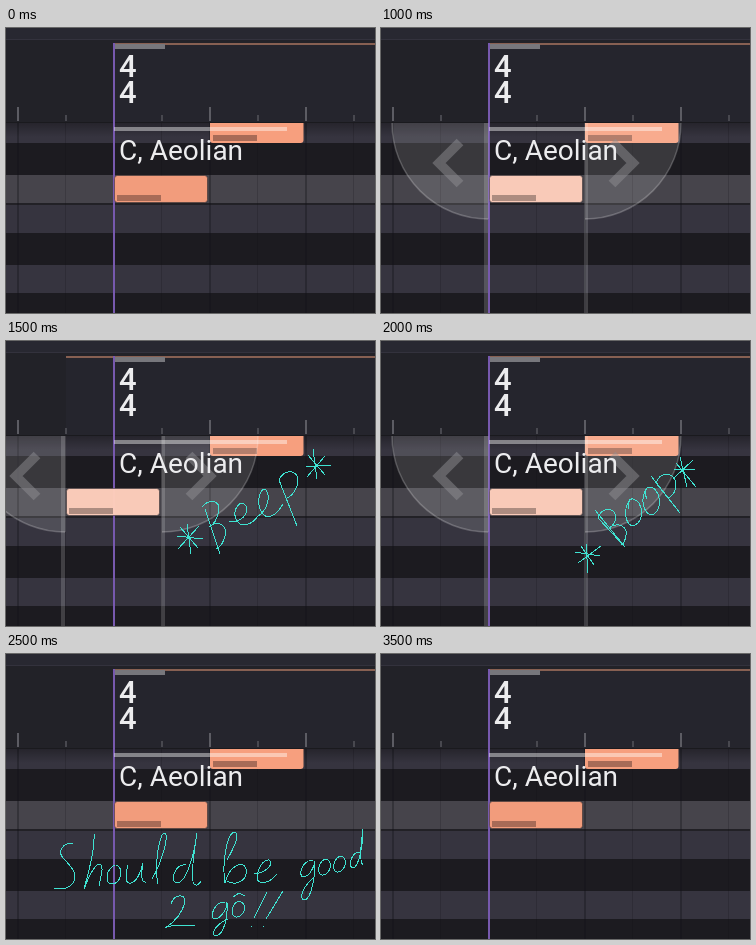
An HTML page for the animation above (4 s loop, 369 px wide and 285 px high).

```html
<!DOCTYPE html>
<html lang="en">
<head>
<meta charset="utf-8">
<style>
  html, body { margin: 0; width: 100%; height: 100%; overflow: hidden; background: #1c1b20; }
  svg { display: block; width: 369px; height: 285px; }
  text { font-family: Roboto, sans-serif; font-size: 28px; fill: #ececee; }
  .meter { font-size: 31px; font-weight: 500; }
  .ink { fill: none; stroke: #3fe3d2; stroke-width: 1; shape-rendering: crispEdges; }
  .chevron { fill: none; stroke: #909094; stroke-opacity: .48; stroke-width: 9.5; }
  .wedge { fill: #fff; fill-opacity: .125; }
  .rim { fill: none; stroke: #fff; stroke-opacity: .22; stroke-width: 1.5; }
  .outline { stroke: #1c1b20; stroke-opacity: .45; }
</style>
</head>
<body>
<svg viewBox="0 0 369 285">
  <defs>
    <linearGradient id="shadow" x2="0" y2="1">
      <stop stop-opacity=".3"/>
      <stop offset="1" stop-opacity="0"/>
    </linearGradient>
  </defs>
  <g id="backdrop"></g>
  <rect y="95" width="369" height="14" fill="url(#shadow)"/>
  <rect id="clipShade" y="15" height="79" fill="#25252d"/>
  <rect id="clipEdge" y="15" height="2" fill="#876052"/>
  <g id="ticks"></g>
  <rect x="107" y="15" width="2" height="270" fill="#7759ae"/>
  <rect x="109" y="16" width="50" height="5" fill="#77777c"/>

  <path d="M204 95H297.5V112Q297.5 115 294.5 115H207Q204 115 204 112Z" fill="#f79f7e"/>
  <rect x="207" y="107" width="44" height="6" fill="#a86b57"/>
  <g id="note">
    <rect id="noteBody" class="outline" x="108.5" y="147.5" width="93" height="27" rx="3" fill-opacity=".97"/>
    <rect id="noteBar" x="111" y="167" width="44" height="6"/>
  </g>

  <g id="handles">
    <path class="wedge" d="M108 95V191A96 96 0 0 1 11 95ZM204 95V191A96 96 0 0 0 300 95Z"/>
    <path class="rim" d="M107 191A96 96 0 0 1 11 95M204 191A96 96 0 0 0 300 95"/>
    <path d="M103 95h4v190h-4zM203 95h4v190h-4z" fill="#fff" fill-opacity=".16"/>
    <path class="chevron" d="M79 114L58 135L79 156M231 114L252 135L231 156"/>
  </g>

  <rect x="108" y="99" width="173" height="4" fill="#fff" fill-opacity=".42"/>
  <text class="meter" x="113" y="49">4</text>
  <text class="meter" x="113" y="75">4</text>
  <text x="113" y="132">C, Aeolian</text>

  <g class="ink" id="beep">
    <path d="M171 195L197 198M181 183L185 213M172 208L193 185M174 186L192 207"/>
    <path d="M199 168L214 213M196 166C202 158 214 159 213 168C212 177 208 184 203 186C212 178 222 185 219 195C217 203 213 207 210 208"/>
    <path d="M223 180C234 183 244 172 240 165C235 157 226 168 230 178C234 188 246 184 252 175C261 170 265 155 260 149C254 145 250 161 255 170C260 181 271 174 277 163"/>
    <path d="M291 185L273 139C277 130 287 128 291 135C294 143 288 154 281 157"/>
    <path d="M300 126L325 124M307 108L311 138M301 136L319 115M302 114L319 134"/>
  </g>
  <g class="ink" id="boop">
    <path d="M194 211L219 215M205 203L207 232M197 222L220 205M200 205L213 224"/>
    <path d="M214 169L244 206L217 177C220 167 231 166 234 173C236 180 232 185 228 187C237 180 247 186 245 194C244 200 242 204 240 204"/>
    <path d="M249 159C241 169 245 188 254 184C264 179 262 160 252 158C248 157 246 162 248 168"/>
    <path d="M266 147C258 157 263 177 273 173C282 167 279 147 269 146C264 146 263 153 266 158"/>
    <path d="M270 135L299 172L275 142C279 131 290 131 294 139C297 148 292 156 286 157"/>
    <path d="M293 128L314 128M299 116L306 146M293 137L312 119M295 122L315 146"/>
  </g>
  <g class="ink" id="ready">
    <path d="M67 189C57 189 51 197 57 204C64 211 73 220 67 229C63 235 54 236 48 234"/>
    <path d="M88 178C89 196 83 216 78 235C83 222 90 207 95 211C99 216 92 226 94 232"/>
    <path d="M109 211C100 215 98 230 106 230C116 229 118 213 110 211"/>
    <path d="M122 211C119 223 119 230 125 229C132 227 135 217 137 209C135 220 135 229 140 228"/>
    <path d="M146 225C156 208 163 182 159 179C153 179 148 213 152 230"/>
    <path d="M180 211C169 209 163 228 171 229C180 229 188 202 191 179C188 198 184 225 188 230C191 233 194 229 195 227"/>
    <path d="M221 206C230 190 234 179 228 178C220 181 216 212 219 229C223 212 237 205 240 215C242 225 232 233 221 227"/>
    <path d="M248 220C260 219 269 209 263 206C254 205 247 226 254 228C261 230 267 225 271 220"/>
    <path d="M307 207C298 204 291 221 297 223C303 223 308 214 309 207C309 225 305 244 299 246C292 246 296 234 307 224"/>
    <path d="M319 205C311 209 311 222 317 221C326 219 327 205 319 205"/>
    <path d="M334 202C326 206 326 219 332 218C341 216 342 202 334 202"/>
    <path d="M354 199C346 196 341 213 347 214C353 213 357 191 357 175C355 191 353 207 357 211"/>
    <path d="M165 250C168 240 180 239 179 248C176 260 167 269 159 274C168 269 177 272 189 271"/>
    <path d="M219 249C210 246 203 262 208 265C215 265 221 255 221 248C222 264 218 280 210 282C203 281 210 270 222 265"/>
    <path d="M232 247C224 252 225 264 231 263C240 261 242 248 232 247M227 243L233 239L239 242"/>
    <path d="M261 238L248 264M245 272L246 273M277 237L260 265M257 272L258 273"/>
  </g>
</svg>
<script>
const el = id => document.getElementById(id);
const rect = (x, y, w, h, fill, opacity = 1) =>
  `<rect x="${x}" y="${y}" width="${w}" height="${h}" fill="${fill}" fill-opacity="${opacity}"/>`;

// Top strip, ruler, then piano-roll rows as [top, height, colour].
const rows = [
  [0, 11, '#282831'], [11, 1, '#33323d'], [12, 82, '#222228'], [94, 1, '#1a1a1e'],
  [95, 20, '#36343f'], [115, 32, '#1c1b20'], [147, 28, '#46444b'], [175, 2, '#222126'],
  [177, 28, '#36343f'], [205, 32, '#1c1b20'], [237, 28, '#36343f'], [265, 20, '#1c1b20']
];
let grid = rows.map(([y, h, fill]) => rect(0, y, 369, h, fill)).join('');
let ticks = '';
for (let i = 0; i < 8; i++) {
  const x = 12 + 48 * i, major = i % 2 === 0;
  grid += rect(x - 1, 95, major ? 2 : 1, 190, '#111116', major ? .33 : .2);
  ticks += major ? rect(x - 1, 79, 2, 14, '#5c5c63') : rect(x - 1, 87, 2, 6, '#48484f');
}
el('backdrop').innerHTML = grid;
el('ticks').innerHTML = ticks;

const show = (id, on) => el(id).style.display = on ? '' : 'none';

function draw(now) {
  const t = now % 4000;
  const held = t >= 1000 && t < 2500;
  const nudged = t >= 1500 && t < 2000;
  const shift = nudged ? -48 : 0;

  for (const id of ['note', 'handles']) el(id).setAttribute('transform', `translate(${shift})`);
  for (const id of ['clipShade', 'clipEdge']) {
    el(id).setAttribute('x', 108 + shift);
    el(id).setAttribute('width', 261 - shift);
  }
  el('noteBody').setAttribute('fill', held ? '#ffcfbc' : '#f89f7e');
  el('noteBar').setAttribute('fill', held ? '#ad8c80' : '#a86b57');

  show('handles', held);
  show('beep', nudged);
  show('boop', held && t >= 2000);
  show('ready', t >= 2500 && t < 3500);
}

const start = performance.now();
function tick() {
  draw(performance.now() - start);
  requestAnimationFrame(tick);
}
tick();
</script>
</body>
</html>
```
